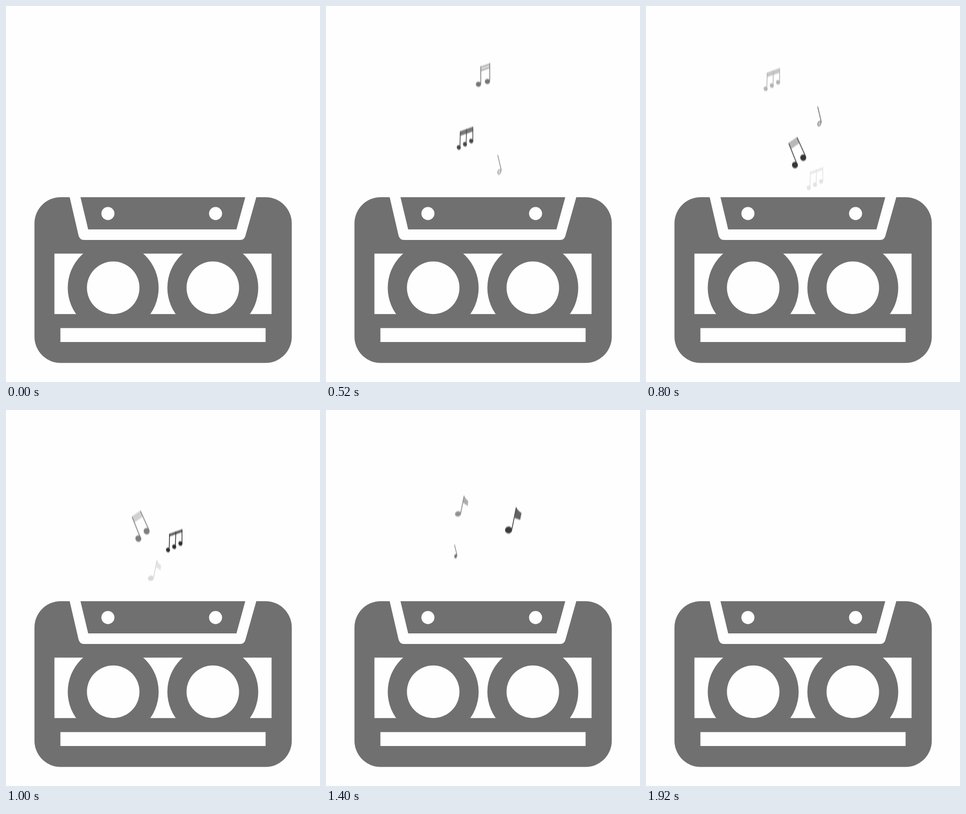
Write an HTML page that moves like this. It is 684 px wide and 818 px high and loops after 1.96 s.

```html
<!DOCTYPE html>
<html lang="en">
<head>
<meta charset="utf-8">
<title>Cassette playing music</title>
<style>
html, body { margin: 0; width: 100%; height: 100%; overflow: hidden; background: #fefefe; }
svg { display: block; width: 684px; height: 818px; }
</style>
</head>
<body>
<svg id="stage" viewBox="0 0 684 818" xmlns="http://www.w3.org/2000/svg">
  <defs>
    <filter id="soft" filterUnits="userSpaceOnUse" x="-100" y="-200" width="900" height="1100" color-interpolation-filters="sRGB">
      <feGaussianBlur stdDeviation="0.4 1.6"/>
    </filter>
  </defs>
  <g id="notes"></g>
  <g fill="#fefefe">
    <rect x="62" y="416" width="560.5" height="360.5" rx="57" fill="#707070"/>
    <path d="M138.5 415 158 499Q160.500 509 170 509H510Q519 509 521.500 500L545.500 415H521.500L502 486H179L162 415Z"/>
    <circle cx="222" cy="451.500" r="14.200"/>
    <circle cx="456.500" cy="451.500" r="14.200"/>
    <rect x="105.500" y="538.700" width="473" height="131.500"/>
    <g fill="#707070">
      <circle cx="233.500" cy="613" r="99"/>
      <circle cx="450.500" cy="613" r="99"/>
    </g>
    <circle cx="233.500" cy="613" r="57.200"/>
    <circle cx="450.500" cy="613" r="57.200"/>
    <rect x="118.500" y="700.700" width="447" height="30.300"/>
  </g>
</svg>
<script>
const LOOP = 1960, STEP = 40;

const head = (x, y, rx, ry, turn = -20) =>
  `<ellipse cx="${x}" cy="${y}" rx="${rx}" ry="${ry}" transform="rotate(${turn} ${x} ${y})"/>`;
const line = (d, width = 1.6) =>
  `<path d="${d}" fill="none" stroke="#000" stroke-width="${width}"/>`;
const area = (d, alpha = 1) => `<path d="${d}" fill-opacity="${alpha}"/>`;

// Two stems under a double beam
const pair = (x, y, stem) =>
  line(`M${x} ${y + 8}v${stem}M${x + 19.5} ${y + 1}v${stem}`) +
  area(`M${x} ${y + 8}l20-7v5l-20 7z`, 0.5) +
  area(`M${x} ${y + 15}l20-7v4l-20 7z`, 0.6) +
  head(x - 5, y + stem + 9, 5.8, 5.5) + head(x + 14.5, y + stem + 3, 5.8, 5.5);

// Three stems under one thick beam
const triple = (x, y, beam, alpha) =>
  line(`M${x} ${y + 11}l-1 33M${x + 13.5} ${y + 6}l-1 32M${x + 27} ${y + 1}l0 32`) +
  area(`M${x - 1} ${y + 11}l28-10 1 ${beam}-29 10z`, alpha) +
  head(x - 3.500, y + 46, 4.400, 5) + head(x + 10, y + 39, 4.400, 5) + head(x + 23.500, y + 32, 4.400, 5);

// Each note is drawn at its pose for time `at` and drifts by (vx, vy) px per ms
const notes = [
  { from: 80, to: 680, at: 360, vx: 0.104, vy: -0.536, art: pair(320.5, 209, 38) },
  { from: 320, to: 880, at: 640, vx: -0.102, vy: -0.456, art: triple(280.5, 207, 10, 0.75) },
  { from: 400, to: 960, at: 640, vx: 0, vy: -0.375,
    art: line('M374 279 382 313', 1.7) +
      '<ellipse cx="377.500" cy="316" rx="3.200" ry="5.300" transform="rotate(18 377.500 316)" fill-opacity=".35" stroke="#000" stroke-width="1.500"/>' },
  { from: 580, to: 1140, at: 800, vx: -0.181, vy: -0.331,
    art: line('M311 299 329 344M329 286 348 328', 1.800) +
      area('M310 298 329 285 335 298 316 311Z', 0.35) +
      head(324.500, 346, 6.500, 7) + head(342.500, 330, 6.500, 7) },
  { from: 770, to: 1330, at: 1240, vx: -0.008, vy: -0.456, art: triple(354.500, 149, 6, 0.75) },
  { from: 960, to: 1520, at: 1240, vx: -0.07, vy: -0.35,
    art: line('M304.500 281 312 243', 1.900) + head(298.800, 282, 6.800, 5.600) +
      area('M312 242Q315 249 321 254L320 265 309 257Z', 0.75) },
  { from: 1190, to: 1740, at: 1240, vx: 0.056, vy: -0.25,
    art: line('M396 299 405.500 252', 1.700) + head(388.800, 301, 7.800, 7.500) +
      area('M405.500 252Q410 260 417 264L414 279 402 275Z', 0.8) },
  { from: 1280, to: 1730, at: 1600, vx: 0, vy: -0.25,
    art: line('M279.800 243 285.500 266', 1.300) + head(282.500, 268, 3, 4.500, 12) },
  { from: 1480, to: 1920, at: 1600, vx: 0.083, vy: -0.25, art: pair(382.500, 276.500, 35) }
];

const layer = document.getElementById('notes');
layer.innerHTML = notes.map(n => `<g><g filter="url(#soft)">${n.art}</g></g>`).join('');
notes.forEach((n, i) => { n.node = layer.children[i]; });

function draw(t) {
  for (const n of notes) {
    const half = (n.to - n.from) / 2;
    const alpha = Math.max(0, 1 - Math.abs(t - n.from - half) / half);
    const age = t - n.at;
    n.node.setAttribute('opacity', alpha.toFixed(3));
    n.node.setAttribute('transform', `translate(${n.vx * age} ${n.vy * age})`);
  }
}

const start = performance.now();
function tick() {
  const t = (performance.now() - start) % LOOP;
  draw(Math.floor(t / STEP) * STEP);
  requestAnimationFrame(tick);
}
tick();
</script>
</body>
</html>
```
